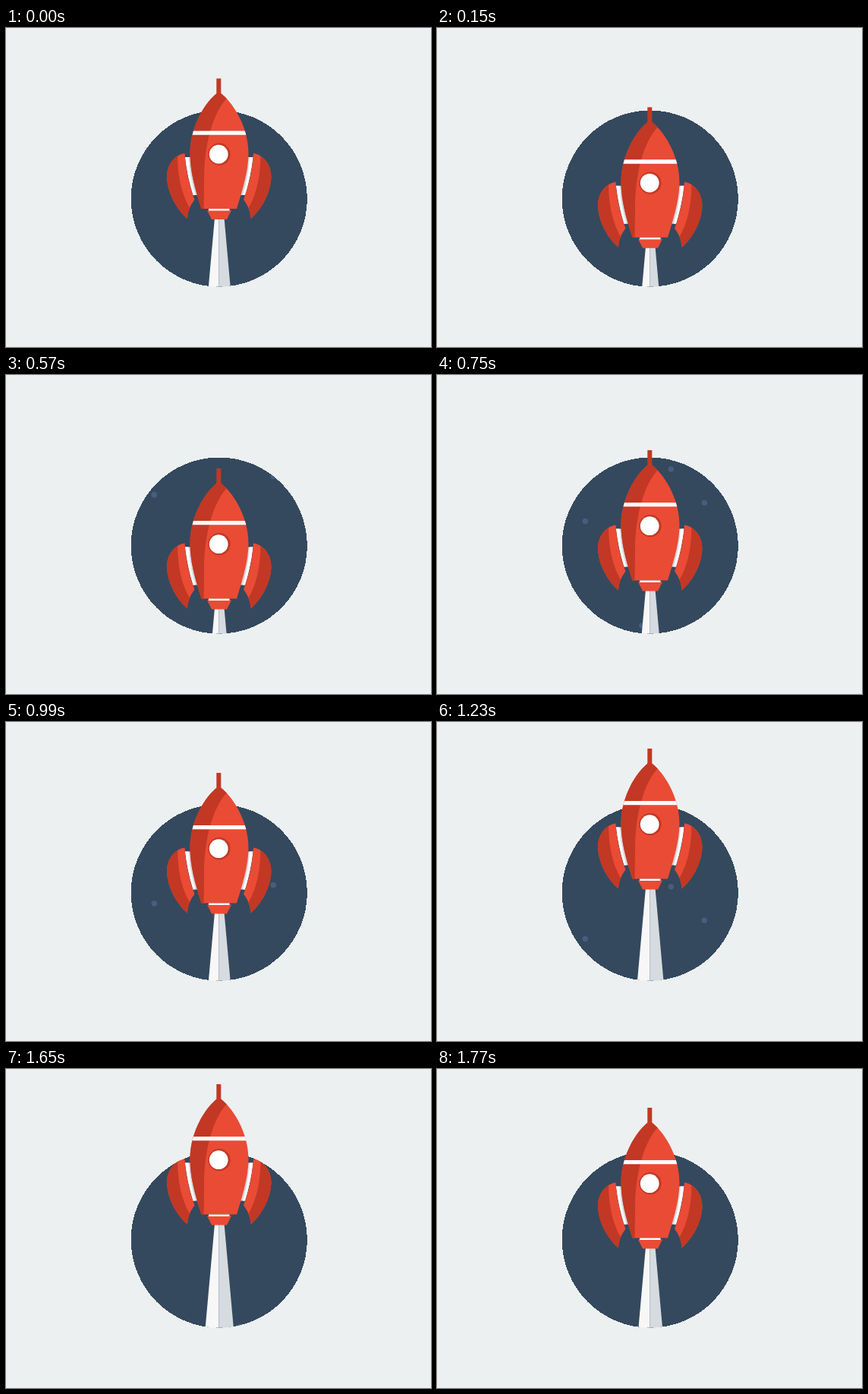
Write an HTML page that moves like this. It is 560 px wide and 420 px high and loops after 1.83 s.

```html
<!DOCTYPE html>
<html lang="en">
<head>
<meta charset="utf-8">
<title>Rocket</title>
<style>
  html, body { margin: 0; width: 100%; height: 100%; overflow: hidden; background: #ecf0f1; }
  svg { display: block; }
  .red { fill: #ea4b35; }
  .dark { fill: #c23824; }
  .white { fill: #fff; }
  .grey { fill: #d6dbdf; }
</style>
</head>
<body>
<svg width="560" height="420" viewBox="0 0 560 420">
  <defs>
    <clipPath id="sky"><circle cx="280.75" cy="224.6" r="116.1"/></clipPath>
    <path id="hull" d="M280.5 84C263 96 242.5 129 242.5 165C242.5 190 250 215 257.5 238H304C311 215 319.5 190 319.5 165C319.5 129 298 96 280.5 84Z"/>
    <clipPath id="inHull"><use href="#hull"/></clipPath>
    <path id="fin" d="M235 165C220 168 212 182 212 196C212.5 218 226 240 239 251C239.5 241 243 233 248.5 226C241 206 237 186 235.5 165Z"/>
    <clipPath id="inFin"><use href="#fin"/></clipPath>
    <g id="side">
      <path class="grey" d="M236 170H246L255 220H246.5Q239 196 236 170Z"/>
      <path class="white" d="M236 170H240.5Q242 196 249.5 220H246.5Q239 196 236 170Z"/>
      <use href="#fin" class="red"/>
      <path class="dark" clip-path="url(#inFin)" d="M226.5 160C225 185 229 215 242 237L239 255H200V160Z"/>
    </g>
  </defs>
  <circle cx="280.75" cy="224.6" r="116.1" fill="#34495e" shape-rendering="crispEdges"/>
  <g clip-path="url(#sky)">
    <g id="stars" fill="#465d7c"></g>
    <g class="ship">
      <path fill="#f7f7f7" d="M275 250H280.5V470H255.2Z"/>
      <path class="grey" d="M280.5 250H287.5L307.3 470H280.5Z"/>
    </g>
  </g>
  <g class="ship">
    <use href="#side"/>
    <use href="#side" transform="translate(561.5) scale(-1 1)"/>
    <path class="dark" d="M277.3 66.5H283.3V90H277.3Z"/>
    <use href="#hull" class="red"/>
    <g clip-path="url(#inHull)">
      <path class="dark" d="M291.5 92C272 112 261 155 261 200L260.5 240H230V80H291.5Z"/>
      <path class="white" d="M230 135.5H330V140.8H230Z"/>
    </g>
    <circle class="dark" cx="281" cy="166.2" r="14.6"/>
    <circle class="white" cx="280.2" cy="166.2" r="12.4"/>
    <path class="red" d="M265 240H297L291 252H271Z"/>
    <path class="white" d="M267 238H294.5V240.5H267Z"/>
  </g>
</svg>
<script>
const LOOP = 1830;
const LOW_TIME = 420, HIGH_TIME = 1600;
const LOW = 134, HIGH = 10.8, REST = 66.5; // heights of the antenna tip
const STAR_TIME = 750;

// x, and y at STAR_TIME
const starSpecs = [[195.3, 192.5], [308.3, 124], [352.3, 168.3], [270, 330]];

const ships = document.querySelectorAll('.ship');
const stars = starSpecs.map(([x]) => {
  const star = document.createElementNS('http://www.w3.org/2000/svg', 'circle');
  star.setAttribute('cx', x);
  star.setAttribute('r', 3.8);
  return document.getElementById('stars').appendChild(star);
});

// Speeds up over the first share, runs evenly, slows down over the last share
function ease(u, first, last) {
  const speed = 1 / (1 - (first + last) / 2);
  if (u < first) return speed * u * u / (2 * first);
  if (u > 1 - last) return 1 - speed * (1 - u) ** 2 / (2 * last);
  return speed * (u - first / 2);
}

function tipY(t) {
  if (t >= LOW_TIME && t < HIGH_TIME) {
    const u = (t - LOW_TIME) / (HIGH_TIME - LOW_TIME);
    return LOW + (HIGH - LOW) * ease(u, .114, .32);
  }
  const fallen = (t - HIGH_TIME + LOOP) % LOOP;
  const u = fallen / (LOOP - HIGH_TIME + LOW_TIME);
  return HIGH + (LOW - HIGH) * ease(u, .044, .488);
}

// Steps of 30 ms at first, 60 ms from 210 ms on
function step(t) {
  const size = t < 210 ? 30 : 60;
  return t - (t + size - 30) % size;
}

function draw(time) {
  const t = step(time % LOOP);
  const y = tipY(t);
  ships.forEach(ship => ship.setAttribute('transform', `translate(0 ${y - REST})`));
  // Stars drift at a constant speed relative to the rocket
  const drift = y - tipY(STAR_TIME) + .327 * (t - STAR_TIME);
  stars.forEach((star, i) => star.setAttribute('cy', starSpecs[i][1] + drift));
}

const start = performance.now();
function tick() {
  draw(performance.now() - start);
  requestAnimationFrame(tick);
}
tick();
</script>
</body>
</html>
```
